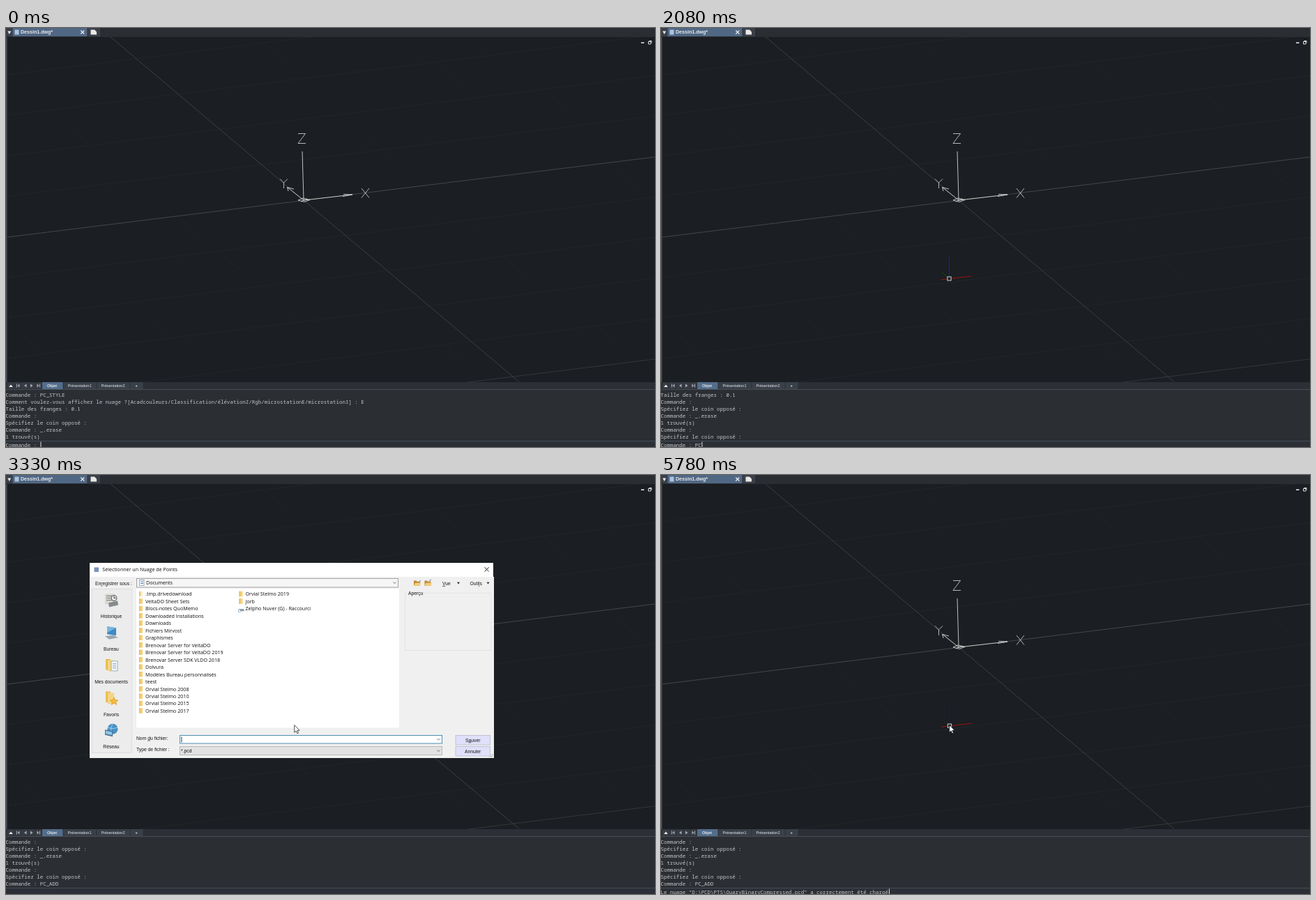
These frames come from a looping animation (931 px wide and 601 px high, 8000 ms). An HTML page:

```html
<!DOCTYPE html>
<html lang="fr">
<head>
<meta charset="utf-8">
<title>Nuage de points</title>
<style>
html, body { margin: 0; width: 100%; height: 100%; overflow: hidden; background: #1b1e22; }
svg { display: block; width: 100%; height: 100%; }
text { white-space: pre; }
.mono { font: 7.46px "Noto Sans Mono", monospace; fill: #c2c5c8; }
.ui { font: 7.1px "Open Sans", sans-serif; fill: #101010; }
.ctl { font: 6.75px "Liberation Sans", sans-serif; fill: #161616; }
.tab { font: 5.5px "Liberation Sans", sans-serif; fill: #e6e8ea; }
.line { fill: none; stroke-width: 1; }
</style>
</head>
<body>
<svg id="stage" viewBox="0 0 931 601" xmlns="http://www.w3.org/2000/svg"></svg>
<script>
const LOOP = 8000;
const FILE = '"D:\\PCD\\PTS\\QuaryBinaryCompressed.pcd"';
const LOG = [
  'Commande : PC_STYLE',
  'Comment voulez-vous afficher le nuage ?[Acadcouleurs/Classification/élévationZ/Rgb/microstationE/microstationI] : E',
  'Taille des franges : 0.1',
  'Commande :',
  'Spécifiez le coin opposé :',
  'Commande : _.erase',
  '1 trouvé(s)',
  'Commande :',
  'Spécifiez le coin opposé :',
  'Commande : PC_ADD'
];
const FOLDERS = [
  '.tmp.drivedownload', 'VeltaDO Sheet Sets', 'Blocs-notes QuoMemo', 'Downloaded Installations',
  'Downloads', 'Fichiers Mirvost', 'Graphismes', 'Brenovar Server for VeltaDO',
  'Brenovar Server for VeltaDO 2019', 'Brenovar Server SDK VLDO 2018', 'Dolvura',
  'Modèles Bureau personnalisés', 'teest', 'Orvial Stelmo 2008', 'Orvial Stelmo 2010',
  'Orvial Stelmo 2015', 'Orvial Stelmo 2017', 'Orvial Stelmo 2019', 'Jorb',
  'Zelpho Nuver (G) - Raccourci'
];

const rect = (x, y, w, h, fill, more = '') =>
  `<rect x="${x}" y="${y}" width="${w}" height="${h}" fill="${fill}" ${more}/>`;
const path = (d, stroke, more = '') => `<path class="line" d="${d}" stroke="${stroke}" ${more}/>`;
const shape = (d, fill, more = '') => `<path d="${d}" fill="${fill}" ${more}/>`;
const text = (x, y, s, cls, more = '') => `<text x="${x}" y="${y}" class="${cls}" ${more}>${s}</text>`;
const group = (id, body = '', more = '') => `<g id="${id}" ${more}>${body}</g>`;
const at = (x, y, body) => `<g transform="translate(${x} ${y})">${body}</g>`;

function viewport() {
  let s = rect(0, 0, 931, 601, '#1b1e22');
  for (let i = 0; i < 10; i++) {
    const y = 67 + i * 58.1;
    if (i !== 4) s += path(`M2 ${y}L931 ${y - 115}`, i === 9 ? '#34373a' : '#22262a');
  }
  // short visible stretches of the lines parallel to Y
  const bits = [[370, 22], [622, 55], [98, 148], [526, 160], [655, 265], [250, 275], [310, 325],
    [715, 330], [875, 205], [402, 404], [205, 415], [25, 442], [625, 452], [780, 95], [845, 425]];
  for (const [x, y] of bits) s += path(`M${x} ${y}l30 25`, '#202427');
  s += path('M2 300L931 185', '#43464a') + path('M149 12L427 247L736 507.5', '#3d4043');
  s += path('M427 247L425 177M427 247L497 239L484 238.5M497 239L483 241.5M427 247L403.5 228.5L413 231M403.5 228.5L405 234'
    + 'M419 247L428 249.5L436 246.5L426 244ZM423 249L432 245', '#dcdddd', 'style="stroke-width:.85"');
  s += path('M419 151.5H429.5L419 165.5H430M510 230L521 243.5M521 230L510 243.5M393 216.5L398.5 222L404 216.5M398.5 222V230',
    '#d0d1d2', 'style="stroke-width:.85"');
  return s;
}

function chrome() {
  let s = rect(0, 0, 931, 13, '#2a2d32') + rect(0, 13, 1.6, 495, '#4a4f56');
  s += rect(0, 0, 9.5, 12, '#3a4049') + shape('M2.3 4.5H7.3L4.8 9Z', '#eee');
  s += rect(9.5, 0, 107, 12, '#516885') + rect(12.5, 2.5, 6, 7, '#a9c3e0');
  s += text(21, 8.4, 'Dessin1.dwg*', 'tab', 'style="font-size:7.1px;font-weight:bold"');
  s += path('M107.3 3.5L112.3 8.5M112.3 3.5L107.3 8.5', '#eee', 'style="stroke-width:1.2"');
  s += rect(117.5, 0, 17.5, 12, '#3b4048') + shape('M121.5 2.5H127L130 5.5V9.5H121.5Z', '#e8e8e8');
  s += rect(911, 20.5, 4.5, 1.5, '#eee') + path('M921.5 19.5H925V23H921.5ZM922.5 18.5H926V21.5', '#ddd');

  s += rect(0, 508, 931, 10, '#2c3036') + path('M0 518.5H931', '#474d54');
  for (let i = 0; i < 5; i++) s += rect(2 + i * 10, 508.5, 9.2, 9, '#373c44');
  s += shape('M4.2 515L7 511.5L9.8 515Z', '#eee');
  s += shape('M19.5 510.5V515.5L16.5 513ZM15 510.5H16V515.5H15ZM29.5 510.5V515.5L26 513ZM35 510.5V515.5L38.5 513ZM44.5 510.5V515.5L47.5 513ZM48 510.5H49V515.5H48Z', '#a3a8af');
  s += rect(52, 508, 29.5, 10, '#536d8c') + rect(82.5, 508, 47, 10, '#3a4049');
  s += rect(130.5, 508, 47, 10, '#3a4049') + rect(178.5, 508, 18, 10, '#3a4049');
  const mid = 'text-anchor="middle"';
  s += text(66, 515, 'Objet', 'tab', mid + ' style="font-weight:bold"');
  s += text(105.5, 515, 'Présentation1', 'tab', mid) + text(153.5, 515, 'Présentation2', 'tab', mid);
  s += text(187, 515.3, '+', 'tab', mid + ' style="font-weight:bold"');

  s += rect(0, 519, 931, 73, '#2b2e33') + rect(0, 592, 931, 9, '#2c3036') + path('M0 592.5H931', '#444d57');
  for (let i = 0; i < 7; i++) s += text(-.5, 528.6 + i * 10, '', 'mono', `id="row${i}"`);
  s += text(-.5, 601.2, '', 'mono', 'id="cmd"') + rect(0, 593.5, 1, 8, '#dedede', 'id="caret"');
  return s;
}

const folder = (x, y, c = '#f5d27a') => shape(`M${x} ${y}h5v7.5h-5z`, c) + shape(`M${x} ${y}h1.6v7.5h-1.6z`, '#e6b95a');
const chevron = (x, y) => path(`M${x - 2.2} ${y - 1}l2.2 2.2l2.2 -2.2`, '#555', 'style="stroke-width:.8"');
const arrowDown = (x, y) => shape(`M${x - 2} ${y - 1.2}h4l-2 2.6z`, '#222');

function places() {
  const bigFolder = shape('M-8 -9H-1V9L-8 6Z', '#e9bd55') + shape('M-5 -7H4V8H-5Z', '#f5d583');
  const screen = shape('M-6 -9L7 -7V4L-6 2Z', '#3f8ac4') + shape('M-6 -9L7 -7L-6 0Z', '#78b5df')
    + shape('M-9 5L3 3.5L10 7L-3 9.5Z', '#9aa7b2');
  const icons = [
    shape('M-9 -9H5V6H-9Z', '#d8d6cf') + path('M-7 -6H3M-7 -3H3M-7 0H3', '#77797a')
      + '<circle cx="4" cy="-3" r="4" fill="#e8e8e8" stroke="#555"/>' + path('M4 -6V-3H6.5', '#444')
      + shape('M-4 4L9 1L10 7L-3 10Z', '#858a8d'),
    screen,
    bigFolder + shape('M0 -6H9V8H0Z', '#f7f7f7', 'stroke="#8a9bab" stroke-width=".8"') + path('M2 -2H7M2 1H7M2 4H7', '#6e9fc8'),
    bigFolder + shape('M4 -1L5.8 3L10 3.3L6.8 6L7.8 10L4 7.8L.2 10L1.2 6L-2 3.3L2.2 3Z', '#f8b83c', 'stroke="#c58a22" stroke-width=".5"'),
    '<circle cx="2" cy="-2" r="7.5" fill="#4a90c4"/>' + path('M-5 -4Q2 -1 9 -4M2 -9Q-3 -1 2 6', '#9fd0ec')
      + shape('M-9 -1L2 1V9L-9 6.5Z', '#4d6e8b') + shape('M-8 .5L1 2.2V7L-8 5Z', '#8cc7ee')
  ];
  const names = ['Historique', 'Bureau', 'Mes documents', 'Favoris', 'Réseau'];
  return names.map((n, i) => at(151, 179.5 + i * 46.7, icons[i])
    + text(151, 205 + i * 46.85, n, 'ctl', 'text-anchor="middle"')).join('');
}

function dialog() {
  const u = c => `<tspan text-decoration="underline">${c}</tspan>`;
  let s = rect(120, 146, 580, 260, '#f0f0f0') + rect(120, 126, 579, 20, '#fff');
  s += text(125, 138.3, 'Sélectionner un Nuage de Points', 'ui', 'id="title"');
  s += group('deco', rect(126.5, 132.5, 6.5, 6.5, '#7894b8') + path('M686.5 132.3L692.7 138.5M692.7 132.3L686.5 138.5', '#222'));
  s += text(128, 157.8, `En${u('r')}egistrer sous :`, 'ctl');
  s += rect(187.5, 148.5, 375, 12.5, '#f6f6f6', 'stroke="#8f8f8f" stroke-width=".8"');
  s += rect(191.5, 150.5, 6.5, 8, '#fff', 'stroke="#6f8ba3" stroke-width=".7"') + path('M193 153H197M193 155.5H197', '#4c83ad');
  s += text(201, 157.2, 'Documents', 'ui') + chevron(557.5, 154.5);
  for (const x of [585, 600.5])
    s += shape(`M${x} 151.5h3.5l1 1.2h4.5v6h-9z`, '#c08a35') + shape(`M${x} 158.7l2 -4h8.5l-2 4z`, '#f3cf78');
  s += path('M607 152L610 150M594 153v-2', '#5c7897');
  s += text(626, 158, u('V') + 'ue', 'ctl') + arrowDown(649, 155) + text(665.5, 158, 'Outi' + u('l') + 's', 'ctl') + arrowDown(691.5, 155);
  s += rect(187, 163, 377, 199.5, '#fff');
  s += rect(123.5, 163.5, 57, 235, '#ececec', 'stroke="#dadada" stroke-width=".8"') + places();
  FOLDERS.forEach((name, i) => {
    const col = i > 16, x = col ? 334.5 : 191, y = 170.8 + (col ? i - 17 : i) * 10.47;
    s += i < 19 ? folder(x, y - 4, i ? undefined : '#faecc6')
      : rect(x, y + .5, 7, 3, '#8b9298') + rect(x - 1, y + 1.5, 3, 3, '#fff', 'stroke="#5285ad" stroke-width=".5"');
    s += text(x + 9, y + 2.6, name, 'ui');
  });
  s += path('M576 169.5H572.5V251.5H696V169.5H600', '#e3e3e3') + text(577, 171.8, 'Aperçu', 'ctl');
  s += text(187, 379.7, `Nom ${u('d')}u fichier:`, 'ctl') + text(187, 396, 'Type de fichier :', 'ctl');
  s += rect(249.5, 373.5, 376, 11.5, '#fff', 'stroke="#4c8fb5"') + chevron(620.5, 379);
  s += rect(249.5, 389.5, 376, 12, '#e2e2e2', 'stroke="#adadad" stroke-width=".8"') + chevron(620.5, 395.5);
  s += text(251, 397.8, '*.pcd', 'ctl') + text(251, 381.6, FILE, 'ctl', 'id="file"');
  s += rect(251.5, 375.5, .9, 8, '#222', 'id="fieldCaret"');
  for (const [y, name] of [[373.5, `S${u('a')}uver`], [389.5, 'Annuler']])
    s += rect(645, y, 49.5, 13.5, '#e0e0fb', 'stroke="#b9b9cc" stroke-width=".8"')
      + text(669.7, y + 9, name, 'ctl', 'text-anchor="middle"');
  return s + path('M693.5 405L698.5 400M696 405L698.5 402.5', '#aaa');
}

const cross = path('M0 0L0 -32', '#1d1db0', 'id="blue"') + path('M0 0L-11 -9.5', '#1a4f1c', 'id="green"')
  + path('M-12 1.6L32 -3.5', '#951414') + rect(-2.6, -2.6, 5.2, 5.2, '#1b1e22', 'stroke="#cfd2d4"');
const pointer = shape('M0 0V10.6L2.4 8.3L4.1 12L5.8 11.3L4.1 7.6H7.4Z', '#fff', 'stroke="#111" stroke-width=".7"');

const stage = document.getElementById('stage');
stage.innerHTML = viewport() + group('cross', cross) + chrome() + group('dialog', dialog())
  + group('pointer', pointer, 'transform="translate(413.7 358.7)"');
const el = {};
stage.querySelectorAll('[id]').forEach(n => el[n.id] = n);

// value of the last step whose time has passed
const step = (t, steps) => steps.reduce((v, s) => t >= s[0] ? s : v);
const show = (n, on) => n.setAttribute('visibility', on ? 'inherit' : 'hidden');

const MOVES = [[0, 390, 380], [190, 432, 415], [260, 505, 470], [330, 585, 525], [390, 640, 541], [460, 664, 503],
  [600, 689, 480], [680, 520, 400], [750, 381, 350], [990, 395, 351], [1060, 483, 372], [1130, 440, 363],
  [1210, 412.8, 359.4], [1920, 413.5, 359.5], [2600, 414, 359.7]];
const DIALOG = [[0, 0, 1], [3130, .35, .97], [3200, .8, .989], [3280, .95, .997], [3330, 1, 1],
  [4600, .7, .985], [4670, .23, .965], [4720, .07, .955], [4780, 0, 1]];
const PROMPT = 'Commande : ';
const COMMAND = [[0, PROMPT], [990, 'Spécifiez le coin opposé : '], [1210, PROMPT], [1720, PROMPT + 'P'],
  [2080, PROMPT + 'PC'], [2470, PROMPT + 'PC_A'], [2600, PROMPT + 'PC_ADD'], [2930, ''],
  [5780, `Le nuage ${FILE} a correctement été chargé`]];
const SCROLL = [[0, 0], [990, 1], [1210, 2], [2930, 3]];

function render(t) {
  const [, x, y] = step(t, MOVES);
  el.cross.setAttribute('transform', `translate(${x} ${y})`);
  show(el.cross, t >= 120 && (t < 3130 || t >= 4600));
  el.blue.setAttribute('opacity', t < 2930 ? 1 : t < 4780 ? .45 : .3);
  el.green.setAttribute('opacity', t < 2930 ? 1 : .35);
  show(el.pointer, t >= 2470);

  const [, alpha, k] = step(t, DIALOG);
  show(el.dialog, alpha > 0);
  el.dialog.setAttribute('opacity', alpha);
  el.dialog.setAttribute('transform', `translate(410 266) scale(${k}) translate(-410 -266)`);
  const active = t < 4520;
  show(el.deco, active);
  el.title.setAttribute('x', active ? 138.3 : 125);
  show(el.file, t >= 3920);
  show(el.fieldCaret, t < 3600);

  const first = step(t, SCROLL)[1];
  for (let i = 0; i < 7; i++) el['row' + i].textContent = LOG[first + i];
  const cmd = step(t, COMMAND)[1];
  el.cmd.textContent = cmd;
  el.caret.setAttribute('x', cmd.length * 4.476 + .2);
  show(el.caret, cmd);
}

const start = performance.now();
function tick() {
  render((performance.now() - start) % LOOP);
  requestAnimationFrame(tick);
}
tick();
</script>
</body>
</html>
```
